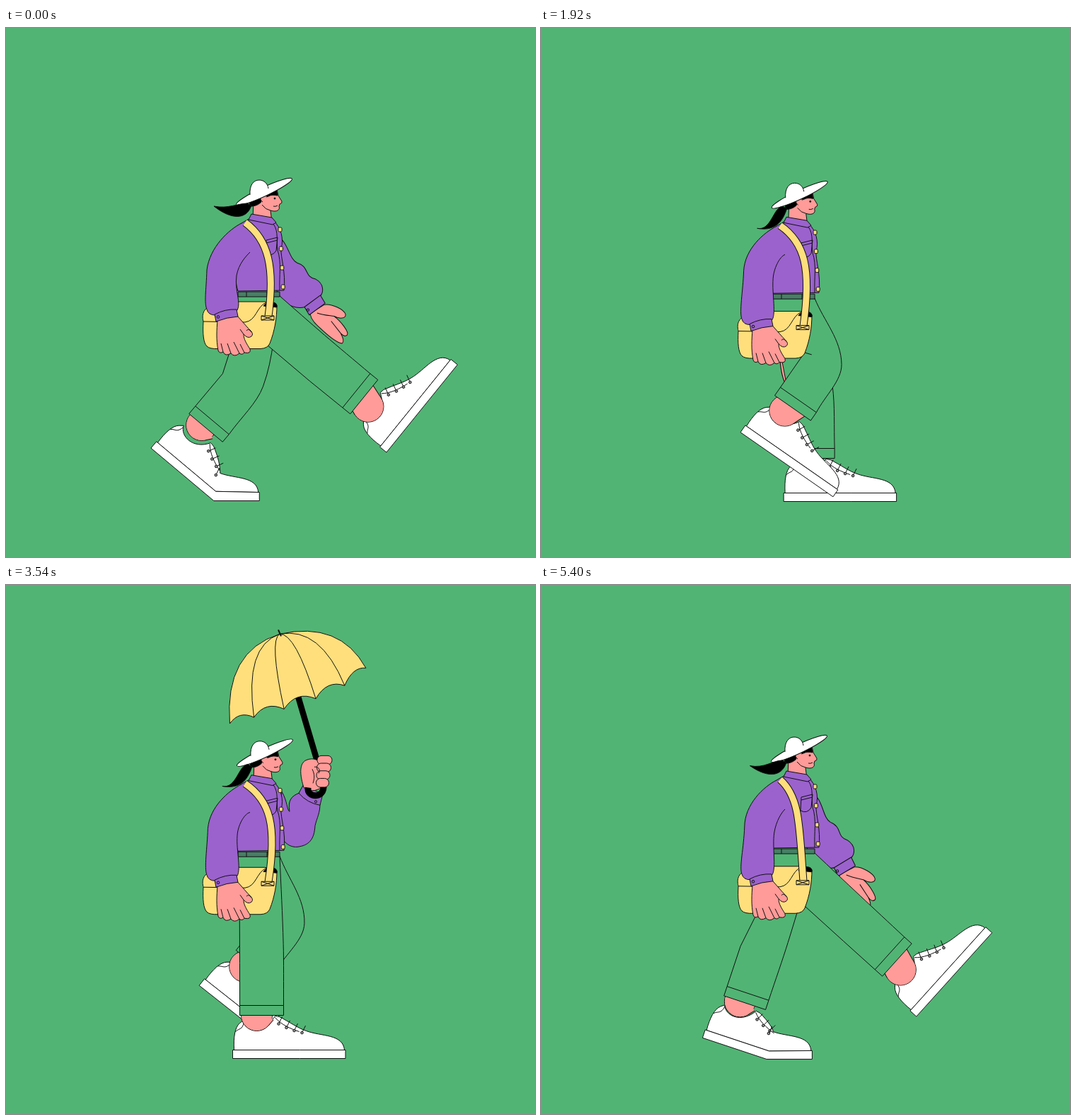
An HTML page for the animation above (5430 ms loop, 748 by 748 pixels).

```html
<!DOCTYPE html>
<html lang="en">
<head>
<meta charset="utf-8">
<title>Walk</title>
<style>
html, body { margin: 0; width: 100%; height: 100%; overflow: hidden; background: #51b474; }
svg { display: block; width: 100vw; height: 100vh; }
</style>
</head>
<body>
<svg id="stage" viewBox="0 0 748 748" stroke="#111" stroke-width="1" stroke-linejoin="round"></svg>
<script>
const LOOP = 5430, STEP = 30, CYCLE = 1087.5;
const GREEN = '#51b474', PURPLE = '#9b62cd', YELLOW = '#ffdf7c', PINK = '#ff9b98', DARK = '#477f66';
const stage = document.getElementById('stage');

const clamp = u => Math.max(0, Math.min(1, u));
const ease = (from, to, t) => { const u = clamp((t - from) / (to - from)); return u * u * (3 - 2 * u); };
const bump = (from, to, t) => Math.sin(Math.PI * clamp((t - from) / (to - from)));
const mix = (a, b, k) => a + (b - a) * k;
const mixPoint = (p, q, k) => [mix(p[0], q[0], k), mix(p[1], q[1], k)];
const rad = a => a * Math.PI / 180;
const turn = (x, y, a) => [x * Math.cos(rad(a)) - y * Math.sin(rad(a)), x * Math.sin(rad(a)) + y * Math.cos(rad(a))];
const add = (p, q, k = 1) => [p[0] + q[0] * k, p[1] + q[1] * k];
const distance = (p, q) => Math.hypot(p[0] - q[0], p[1] - q[1]);

const at = p => p[0].toFixed(2) + ',' + p[1].toFixed(2);
const path = (d, fill = 'none', extra = '') => `<path d="${d}" fill="${fill}" ${extra}/>`;
const dot = (x, y, r, fill, extra = '') => `<circle cx="${x}" cy="${y}" r="${r}" fill="${fill}" ${extra}/>`;
const group = (transform, body) => `<g transform="${transform}">${body}</g>`;
const thick = (d, width, color) => path(d, 'none', `stroke="${color}" stroke-width="${width}"`);
const warp = (d, map) => d.replace(/(-?[\d.]+),(-?[\d.]+)/g, (_, x, y) => at(map(+x, +y)));

// Key poses of one foot over a stride: phase, heel x, heel y, sole angle.
const STRIDE = [
  [0, 538, 600, -51], [.19, 356, 668, -1.5], [.25, 322, 669.5, 0], [.4, 292, 669.5, 0],
  [.466, 228, 640, 18.6], [.5, 205, 594, 40], [.6, 188, 540, 62], [.69, 227, 529, 57],
  [.762, 279, 570, 36], [.9, 426, 627, -15.4], [.966, 531, 610, -48]
];

// Periodic monotone cubic through the key poses.
function footPose(p) {
  const n = STRIDE.length;
  const key = (i, j) => STRIDE[(i + n) % n][j] + (j ? 0 : Math.floor(i / n));
  let i = 0;
  while (i < n - 1 && STRIDE[i + 1][0] <= p) i++;
  const h = key(i + 1, 0) - key(i, 0), s = (p - key(i, 0)) / h;
  return [1, 2, 3].map(j => {
    const slope = k => (key(k + 1, j) - key(k, j)) / (key(k + 1, 0) - key(k, 0));
    const tangent = k => {
      const l = slope(k - 1), r = slope(k);
      return l * r <= 0 ? 0 : 2 * l * r / (l + r);
    };
    return mix(key(i, j), key(i + 1, j), s * s * (3 - 2 * s))
      + h * s * (1 - s) * (tangent(i) * (1 - s) - tangent(i + 1) * s);
  });
}

// Maps shoe coordinates (heel bottom at 0,0) to the stage; the toe stays flat while the heel lifts.
function shoeMap(heel, a, toe) {
  const ball = 95, stretch = .01 * Math.max(0, a - toe - 18);
  const pivot = add(heel, turn(ball * (1 + stretch), 0, a));
  return (x, y) => x <= ball
    ? add(heel, turn(x * (1 + stretch * clamp(1 + y / 40)), y, a))
    : add(pivot, turn(x - ball, y, toe));
}

function shoe(map) {
  let s = path(warp('M2,-12 C1,-30 3,-44 10,-50 L15,-54 C20,-40 45,-36 60,-60 L66,-59 C80,-52 92,-43 104,-39 C125,-31 156,-35 158,-12 L95,-12 Z', map), '#fff')
    + path(warp('M0,0 L95,0 L159.5,0 L159.5,-12 L95,-12 L0,-12 Z', map), '#fff')
    + path(warp('M16,-52 C14,-40 9,-43 4,-38 M60,-58 C68,-48 82,-42 94,-38', map));
  for (let i = 0; i < 4; i++) {
    const x = 65 + i * 11, y = -49 + i * 6 - i * i * .6;
    s += path(warp(`M${x},${y} L${x + 5},${y - 10}`, map)) + dot(...map(x, y), 1.8, '#999');
  }
  return s;
}

// The shin stands square on the sole, so the foot alone sets the pose of the leg.
function leg(p, shift, drop) {
  const [x, y, a] = footPose(p);
  const toe = a > 0 ? a * ease(.5, .66, p) : a;
  const map = shoeMap([x + shift, y], a, toe);
  const ankle = map(34, -61 - (a - toe) * .25);
  const cuff = map(41, -61 - Math.min(13, Math.abs(a) * .27));
  const down = turn(0, 1, a), front = turn(1, 0, a);
  const f = add(cuff, front, 31), b = add(cuff, front, -31);
  const fi = add(f, down, -14), bi = add(b, down, -14);
  const hip = [387, 379 + drop * .75];
  const joint = mixPoint(add(cuff, down, -95), mixPoint([358, 382], cuff, .45), .2);
  const knee = add(joint, front, 31), back = add(b, down, -74);
  const span = distance(hip, fi), dir = [(fi[0] - hip[0]) / span, (fi[1] - hip[1]) / span];
  const c1 = mixPoint(hip, knee, .35), c2 = add(knee, dir, -.35 * distance(hip, knee));
  const c3 = add(knee, dir, .3 * distance(knee, fi)), c4 = mixPoint(fi, knee, .35);
  const shin = `M${at(ankle)} L${at(add(cuff, down, -8))}`;
  const bent = a > 25 && p > .62;
  return shoe(map) + dot(...ankle, 22, PINK) + thick(shin, 45, '#111') + thick(shin, 43, PINK)
    + dot(...ankle, 21.5, PINK, 'stroke="none"')
    + path(`M${at(hip)} C${at(c1)} ${at(c2)} ${at(knee)} C${at(c3)} ${at(c4)} ${at(fi)} L${at(f)} L${at(b)} L${at(bi)} L${at(back)} L330,415`, GREEN)
    + path(`M${at(fi)} L${at(bi)}` + (bent ? ` M${at(back)} l10 3` : ''));
}

// Rim points run from u = -1 to 1; each state gives their side and length along the shaft.
const CANOPY = [
  { n: u => 3 + 103 * (1.15 * u - .15 * u ** 3), l: u => 105 - 28 * ((1 + u) / 2) ** 4, bow: [.82, .04] },
  { n: u => 90 * u * Math.abs(u) ** .6, l: u => 100 + 45 * (1 - u * u), bow: [.3, .55] },
  { n: u => 13 * u, l: () => 166, bow: [.9, .5] }
];

function canopy(fold) {
  const tip = [387, 59], axis = [.25, .968], side = [.968, -.25];
  const i = fold < .5 ? 0 : 1, k = fold * 2 - i, from = CANOPY[i], to = CANOPY[i + 1];
  const place = (n, l) => at(add(add(tip, axis, l), side, n));
  const rim = [];
  for (let j = 0; j < 6; j++) {
    const u = -1 + j * .4;
    rim.push([mix(from.n(u), to.n(u), k), mix(from.l(u), to.l(u), k)]);
  }
  const [bn, bl] = mixPoint(from.bow, to.bow, k);
  const bow = ([n, l]) => place(n * bn, l * bl);
  let d = `M${at(tip)} Q${bow(rim[0])} ${place(...rim[0])}`;
  for (let j = 1; j < 6; j++) {
    const u = rim[j - 1], v = rim[j];
    d += ` Q${place((u[0] + v[0]) / 2, (u[1] + v[1]) / 2 - .42 * (v[0] - u[0]))} ${place(...v)}`;
  }
  d += ` Q${bow(rim[5])} ${at(tip)} Z`;
  return path(d, YELLOW) + rim.slice(1, 5).map(r => path(`M${at(tip)} Q${bow(r)} ${place(...r)}`)).join('')
    + thick('M385,53 L389,62', 2, '#111');
}

function raisedArm(t, drop) {
  const rot = 175 * (1 - ease(1930, 2380, t)) - 14.5 * ease(4100, 4350, t) + 200 * ease(4370, 4760, t);
  const reach = 1 + .08 * ease(4360, 4430, t);
  const fold = 1 - ease(2210, 2400, t) + ease(4180, 4520, t);
  let s = thick('M389,66 L441,242', 8.5, '#000') + canopy(fold)
    + path('M390,282 C398,295 397,308 401,310 C398,294 404,288 414,284 L444,299 C444,312 440,318 437,330 C436,350 428,358 412,360 C398,361 390,350 384,336 Z', PURPLE)
    + path('M414,284 L420,273 L448,285 L444,301 Q426,298 414,284 Z', PURPLE) + dot(438, 296, 1.6, PURPLE)
    + path('M421,276 C416,260 414,244 423,238 C431,234 438,235 444,240 L452,268 L443,278 Q430,284 421,276 Z', PINK)
    + thick('M427,276 C425,291 451,293 449,272', 9, '#000');
  for (let i = 0; i < 4; i++) {
    s += `<rect x="${440 - i * .5}" y="${231 + i * 10.7}" width="${21 - i}" height="12.5" rx="6" fill="${PINK}"/>`;
  }
  s += path('M436,247 C440,246 446,250 442,256 M433,250 C437,258 436,264 434,270');
  return group(`translate(0 ${drop * 1.8}) translate(378 320) rotate(${rot}) scale(${reach}) translate(-378 -320)`, s);
}

function swingingArm(p, drop) {
  const a = 26 - 32 * Math.cos(2 * Math.PI * (p - .11));
  const s = path('M432,402 L452,389 C462,387 480,395 482,402 C483,408 474,409 466,405 C476,412 488,427 485,431 C482,434 479,432 476,429 C480,436 481,441 478,443 C470,442 458,432 450,425 C442,418 434,412 432,402 Z', PINK)
    + path('M442,401 C452,404 458,404 466,405 M462,412 L476,429')
    + path('M382,292 C400,303 400,325 412,331 C430,336 422,350 438,353 C452,360 450,372 446,377 L425,393 C405,398 388,385 380,360 Z', PURPLE)
    + path('M446,376 L453,387 L431,404 L424,393 Z', PURPLE) + dot(429, 397, 1.6, PURPLE);
  return group(`translate(378 ${300 + drop * .8}) rotate(${a}) scale(${1 + a / 270}) translate(-378 -300)`, s);
}

function head(hang) {
  const tx = 294 + 11 * hang, ty = 252 + 27 * hang;
  return path('M350,244 L349,270 L376,274 L374,258 C383,261 388,257 386,252 L387,249 Q391,248 390,245 L385,237 L383,228 L352,236 Z', PINK)
    + path('M344,252 L346,238 L382,226 L384,237 Q376,235 371,238 Q362,240 360,247 Q353,253 344,252 Z', '#000')
    + path('M369,238 C360,235 357,242 363,246', PINK) + path('M362,250 Q367,257 374,258')
    + dot(380, 241, 1, '#111') + path('M378,252 Q381,253 384,251')
    + '<ellipse cx="365" cy="231.5" rx="43.5" ry="6.3" transform="rotate(-25 365 231.5)" fill="#fff"/>'
    + path('M345,237 C344,222 350,215 358,215 C365,215 370,220 371,227 Q360,234 345,237 Z', '#fff', 'stroke="none"')
    + path('M345,236 C344,222 350,215 358,215 C365,215 370,220 371,227')
    + path(`M341,248 C328,248 ${tx + 20},${ty + 4} ${tx},${ty} C${tx + 24},${ty + 19 - 15 * hang} 340,272 347,251 Z`, '#000');
}

function torso() {
  let s = path('M328,373 h59 v7 h-59 Z M340,373 v7 M369,373 v7', DARK)
    + path('M333,276 L345,269 L378,272 C389,282 393,298 389,312 C388,324 396,345 393,371 L328,372 C321,350 325,328 335,322 L325,290 Z', PURPLE)
    + path('M347,263 L376,268 L382,275 L377,278 L343,271 Z', PURPLE)
    + path('M378,277 C386,288 382,302 384,314 C390,332 386,350 387,371 M368,300 L384,296 L382,315 Q376,324 367,319 Z M368,304 L384,300');
  for (let i = 0; i < 4; i++)
    s += `<rect x="${385 + i * 1.4}" y="${282 + i * 27}" width="5" height="6" rx="1.5" fill="${YELLOW}"/>`;
  return s;
}

function bag() {
  return path('M287,394 C276,400 278,410 279,415 C278,432 279,445 284,450 Q288,454 300,453.5 L360,453.5 Q370,453 373,446 C380,428 383,410 383,392 L366,387 L330,387 Z', YELLOW)
    + path('M279,415 L338,416 C354,414 354,394 368,388') + path('M364,393 Q369,386 378,388 Q384,389 383,395 Z', '#000');
}

function sleeve(drop, g) {
  const ex = 284 - drop * .5 + g * .35, ey = 342 + drop * .4, ix = ex + 42;
  return path(`M333,${276 + drop} C315,${285 + drop} 288,${310 + drop * .6} ${ex},${ey} C${ex - 1},372 280,${388 + g} 284,${398 + g} Q286,${406 + g} 296,${406 + g} L327,${399 + g} C333,${388 + g} ${ix - 3},372 ${ix},350 C${ix + 3},333 340,322 345,${317 + drop * .8}`, PURPLE);
}

function hand() {
  return path('M299,412 C298,428 297,440 300,456 Q302,461 307,458 Q310,465 318,460 Q323,466 330,460 Q334,463 337,459 Q347,461 345,454 C340,446 336,440 336,433 Q342,440 347,436 C351,432 346,428 342,424 L327,407 Z', PINK)
    + path('M307,458 L304,446 M318,460 L313,446 M330,460 L322,444 M337,459 L331,447 M336,433 L331,426 M340,428 Q343,424 347,430')
    + path('M295,405 Q310,397 326,398 L328,408 Q312,409 297,415 Z', PURPLE) + dot(300, 408.5, 1.8, PURPLE);
}

function draw(t) {
  const p = t / CYCLE % 1, far = (p + .5) % 1, half = p * 2 % 1;
  const drop = 15 * bump(0, .62, half) ** 1.5;
  const g = 14 * (ease(.37, .55, half) - ease(.9, 1, half));
  const hang = ease(.2, .53, half) - ease(.7, 1, half);
  const pull = 32 * bump(.55, 1, half) - drop * .6;
  const strap = `M338,${275 + drop} C${372 - pull * .4},${300 + drop * .8} ${380 - pull},340 371,${408 + g}`;
  const raised = t >= 1930 && t < 4760;
  stage.innerHTML = `<rect width="748" height="748" fill="${GREEN}" stroke="none"/>`
    + (raised ? raisedArm(t, drop) : swingingArm(p, drop))
    + leg(far, 26 * bump(0, .46, far), drop) + leg(p, 0, drop)
    + path('M329,375 h57 v25 h-57 Z', GREEN, 'stroke="none"')
    + group(`translate(${drop * .17} ${drop})`, head(hang))
    + group(`matrix(1 0 0 ${1 - drop * .0023} 0 ${drop * 1.6})`, torso())
    + group(`translate(0 ${g})`, bag())
    + sleeve(drop, g)
    + group(`translate(0 ${g})`, hand())
    + thick(strap, 11, '#111') + thick(strap, 9, YELLOW)
    + group(`translate(0 ${g})`, path('M361,407 h18 v6 h-18 Z l18,6 m0,-6 l-18,6', YELLOW));
}

let start;
function tick(now) {
  if (start === undefined) start = now;
  draw(Math.floor((now - start) % LOOP / STEP) * STEP);
  requestAnimationFrame(tick);
}
draw(0);
requestAnimationFrame(tick);
</script>
</body>
</html>
```
